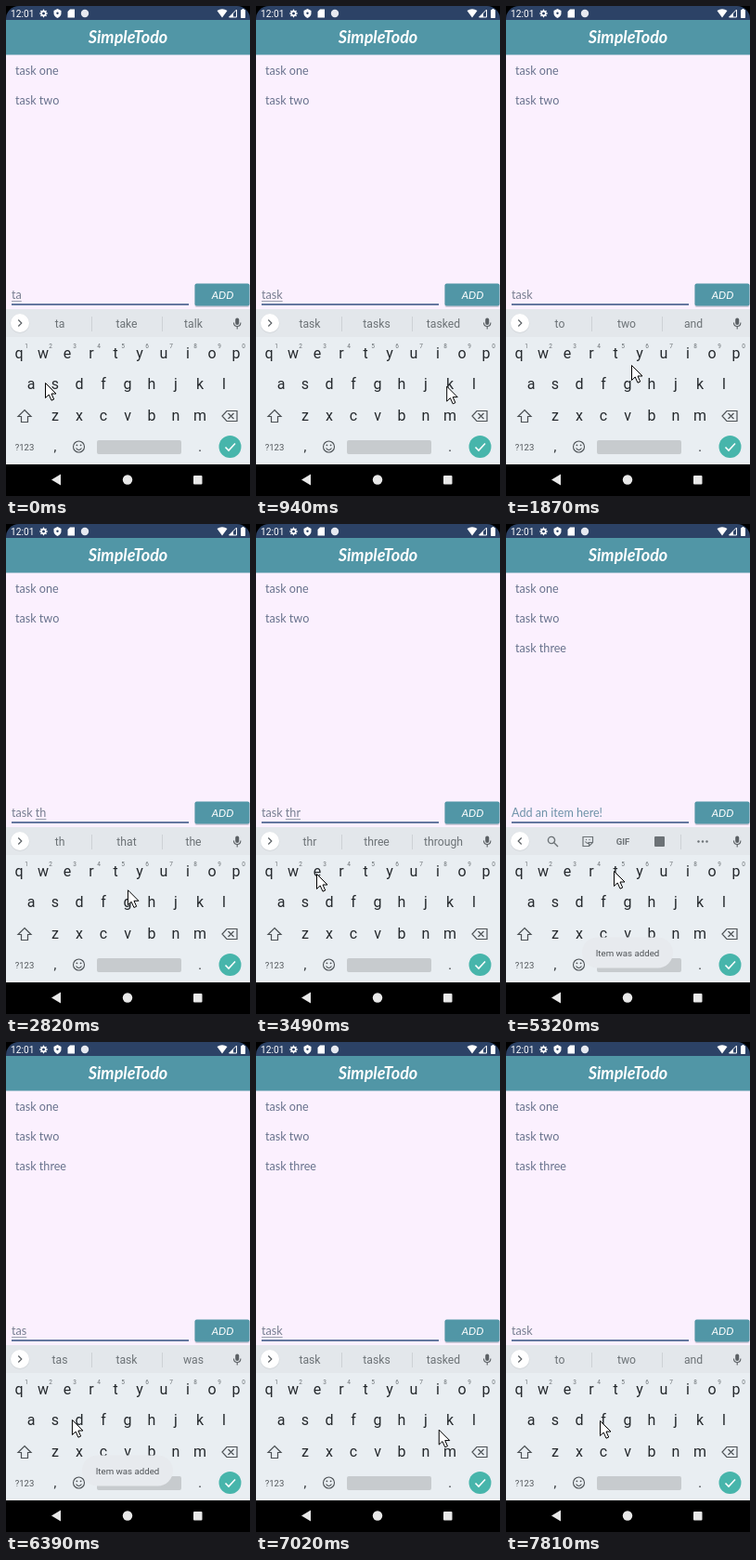
Recreate the animation shown at these times as an HTML page with a canvas. Size 263 by 527 pixels, loop 8 s.

```html
<!DOCTYPE html>
<html lang="en">
<head>
<meta charset="utf-8">
<title>Todo list</title>
<style>
  html, body { margin: 0; width: 263px; height: 527px; overflow: hidden; }
  canvas { display: block; }
</style>
</head>
<body>
<canvas id="stage" width="263" height="527"></canvas>
<script>
const ctx = document.getElementById('stage').getContext('2d');
const LOOP = 8000, STEP = LOOP / 60;
const TEAL = '#5196a6', INK = '#68728d', KEY = '#25292d', GREY = '#6c7276';
const APP_FONT = '12.6px Lato, sans-serif';
const CLEARED = 4650, ADDED = 4790, TOAST_END = 6900;

const keyRows = ['qwertyuiop', 'asdfghjkl', 'zxcvbnm'];
const keyX = (row, i) => [14, 27, 53][row] + 26 * i;

function keyPlace(key) {
  if (key === ' ') return [142, 468];
  const row = keyRows.findIndex(keys => keys.includes(key));
  return [keyX(row, keyRows[row].indexOf(key)) - 1, 373 + 33 * row];
}

// Pointer stops: arrival time and the key pressed, or a bare place
const stops = [
  [0, [42, 405]], [270, 's'], [810, 'k'], [1450, ' '], [1860, [135, 386]],
  [2400, 't'], [2530, 'h'], [3100, 'r'], [3460, [65, 376]], [3760, 'e'], [3880, 'e'],
  [4130, [142, 341]], [4550, [235, 309]], [4800, [235, 309]], [5330, [116, 373]],
  [5450, 't'], [5900, 'a'], [6250, 's'], [6760, 'k'], [7280, ' '], [7730, [101, 407]]
].map(([time, goal]) => typeof goal === 'string'
  ? { time, key: goal, place: keyPlace(goal) }
  : { time, key: '', place: goal });

const guesses = {
  t: 'to the', ta: 'take talk', tas: 'task was', task: 'tasks tasked', th: 'that the',
  thr: 'three through', thre: 'three there', three: 'threesome threes'
};

function entryAt(t) {
  const from = t < CLEARED ? 0 : CLEARED;
  const keys = stops.filter(s => s.time >= from && s.time <= t).map(s => s.key);
  return (from ? '' : 'ta') + keys.join('');
}

function suggest(entry) {
  const word = entry.split(' ').pop();
  if (!entry) return [];
  return (word ? `${word} ${guesses[word]}` : 'to two and').split(' ');
}

function pointerAt(t) {
  const i = stops.findLastIndex(s => s.time <= t);
  const a = stops[i], b = stops[i + 1] || a, rest = 50;
  const k = a === b ? 0 : Math.max(0, (t - a.time - rest) / (b.time - a.time - rest));
  const eased = k * k * (3 - 2 * k);
  return a.place.map((p, axis) => p + (b.place[axis] - p) * eased);
}

function text(str, x, y, font, color, align = 'left') {
  ctx.font = font;
  ctx.fillStyle = color;
  ctx.textAlign = align;
  ctx.fillText(str, x, y);
}

function rect(x, y, w, h, color, r = 0) {
  ctx.fillStyle = color;
  ctx.beginPath();
  ctx.roundRect(x, y, w, h, r);
  ctx.fill();
}

const dot = (x, y, r, color) => rect(x - r, y - r, 2 * r, 2 * r, color, r);

function fill(d, color) {
  ctx.fillStyle = color;
  ctx.fill(new Path2D(d));
}

function line(d, color, width = 1.2) {
  ctx.strokeStyle = color;
  ctx.lineWidth = width;
  ctx.stroke(new Path2D(d));
}

const ring = (x, y, r) => `M${x + r} ${y}a${r} ${r} 0 1 1 ${-2 * r} 0a${r} ${r} 0 1 1 ${2 * r} 0`;

function statusBar() {
  rect(0, 0, 263, 15, '#000');
  rect(0, 0, 263, 15, '#2c4266', [14, 14, 0, 0]);
  text('12:01', 5, 11.5, '10.2px Roboto, sans-serif', '#fff');
  line(ring(40.5, 8, 2.4), '#fff', 1.8);
  for (let i = 0; i < 8; i++) {
    const a = i * Math.PI / 4;
    dot(40.5 + 3.6 * Math.cos(a), 8 + 3.6 * Math.sin(a), .8, '#fff');
  }
  fill('M55.5 3l4 2v3q0 3-4 5q-4-2-4-5v-3z', '#fff');
  dot(55.5, 7.8, 1.2, '#2c4266');
  fill('M69 3.5h5v9h-7.5v-6.500z', '#fff');
  dot(85, 8, 4.2, '#e6e9f0');
  fill('M227.5 5q5.5-3.5 11 0l-5.5 7.5z', '#fff');
  line('M248.5 4v8h-8z', '#fff', 1);
  fill('M245 7.5v4.5h-4.500z', '#fff');
  rect(253, 4, 5, 9, '#fff', .8);
  rect(254.5, 3, 2, 2, '#fff');
}

function app(t, entry) {
  rect(0, 52, 263, 274, '#fbf0fe');
  rect(0, 15, 263, 37.5, TEAL);
  text('SimpleTodo', 131.5, 40, 'italic bold 18px Lato, cursive', '#fff', 'center');

  const items = ['task one', 'task two'];
  if (t >= ADDED) items.push('task three');
  items.forEach((item, i) => text(item, 10, 73.5 + 32 * i, APP_FONT, INK));

  text(entry || 'Add an item here!', 6, 314.5, APP_FONT, entry ? '#777e90' : '#6d91a8');
  const word = entry.split(' ').pop();
  if (word) {
    const start = 6 + ctx.measureText(entry.slice(0, -word.length)).width;
    rect(start, 317, ctx.measureText(word).width, 1, '#9b9fae');
  }
  rect(6, 320, 191, 2, '#64789f');

  rect(203.5, 299, 59, 25, '#d3ccda', 2);
  rect(203.5, 298.5, 59, 24, t > 4500 && t < 4950 ? '#79afbc' : TEAL, 2);
  text('ADD', 233.5, 314.5, 'italic 11.5px Lato, sans-serif', '#fff', 'center');
}

function toolIcons() {
  line(ring(49, 340, 3.6) + 'M52 343l4 4', GREY, 1.4);
  line('M83 336.500h10.500v6l-4 4h-6.500zM93.500 342.500h-4v4M85.500 341.500q2 3 4 1', GREY);
  dot(86.5, 339.5, .7, GREY);
  dot(90, 339.5, .7, GREY);
  text('GIF', 126, 345, 'bold 9.5px Roboto, sans-serif', GREY, 'center');
  rect(160, 336, 11, 11, GREY, 1);
  rect(188, 334, 1, 16, '#cdd1d5');
  for (let i = -1; i < 2; i++) dot(212 + 4.5 * i, 341.5, 1.2, GREY);
}

function suggestionBar(words) {
  rect(0, 326, 263, 30, '#e3e7eb');
  dot(15, 341.5, 10.5, '#d5d9dd');
  dot(15, 341, 10, '#fff');
  const side = words.length ? 1 : -1;
  line(`M${15 - 1.7 * side} 337.5l${3.5 * side} 3.5l${-3.5 * side} 3.5`, '#5b6064');
  if (!words.length) toolIcons();
  words.forEach((word, i) => {
    text(word, 58 + 72 * i, 346, '12.2px Roboto, sans-serif', GREY, 'center');
    if (i) rect(16 + 76 * i, 334, 1, 16, '#cdd1d5');
  });
  rect(247.2, 335.5, 4, 7.5, '#5b6064', 2);
  line('M245.5 340.5q0 4 3.7 4q3.7 0 3.7-4M249.2 344.5v3', '#5b6064', 1.1);
}

function keyboard() {
  rect(0, 356, 263, 137, '#e9eef2');
  keyRows.forEach((keys, row) => [...keys].forEach((key, i) =>
    text(key, keyX(row, i), 378.5 + 33.7 * row, '16px Roboto, sans-serif', KEY, 'center')));
  for (let i = 0; i < 10; i++) {
    text((i + 1) % 10, 22 + 26 * i, 368, '6.5px Roboto, sans-serif', GREY, 'center');
  }

  line('M20 434.500l7 7h-3.500v6h-7v-6h-3.500z', '#4c5155');
  line('M238 435.500h11v11h-11l-5-5.500zM239.500 438l6 6M245.500 438l-6 6', '#4c5155');

  text('?123', 20, 478, '9.5px Roboto, sans-serif', '#53585c', 'center');
  text(',', 53, 479, '14px Roboto, sans-serif', KEY, 'center');
  text('.', 209, 479, '14px Roboto, sans-serif', KEY, 'center');
  line(ring(78.5, 474, 6) + 'M75.500 475.500q3 4 6 0', '#4c5155', 1.1);
  dot(76.4, 472.3, .9, '#4c5155');
  dot(80.6, 472.3, .9, '#4c5155');
  rect(98, 467, 91, 15, '#c7cbce', 2);
  dot(241.5, 474, 12, '#47b5ab');
  line('M236.500 474.500l3.500 3.500l7-7.500', '#fff', 1.6);
}

function navBar() {
  rect(0, 493, 263, 34, '#000');
  fill('M49 509.500l10-6v12z', '#e8e8e8');
  dot(131, 509.5, 5.2, '#e8e8e8');
  rect(202, 505, 9.5, 9.5, '#e8e8e8', 1);
}

function toast(t) {
  const alpha = Math.min((t - CLEARED) / 250, (TOAST_END - t) / 200, 1);
  if (alpha <= 0) return;
  ctx.globalAlpha = alpha;
  rect(82, 444.5, 98, 33, '#e7eaee', 16.5);
  text('Item was added', 131, 465, '9.7px Roboto, sans-serif', '#4f5357', 'center');
  ctx.globalAlpha = 1;
}

function drawPointer([x, y]) {
  const arrow = 'M0 0v16l3.7-3.5l2.8 6.2l2.7-1.2l-2.7-6h5z';
  ctx.save();
  ctx.translate(x + .5, y + .5);
  fill(arrow, '#fff');
  line(arrow, '#000', 1);
  ctx.restore();
}

function frame(now) {
  const t = Math.floor((now % LOOP + 20) / STEP) * STEP;
  const entry = entryAt(t);
  statusBar();
  app(t, entry);
  suggestionBar(suggest(entry));
  keyboard();
  navBar();
  toast(t);
  drawPointer(pointerAt(t));
}

const start = performance.now();
(function tick() {
  frame(performance.now() - start);
  requestAnimationFrame(tick);
})();
</script>
</body>
</html>
```
